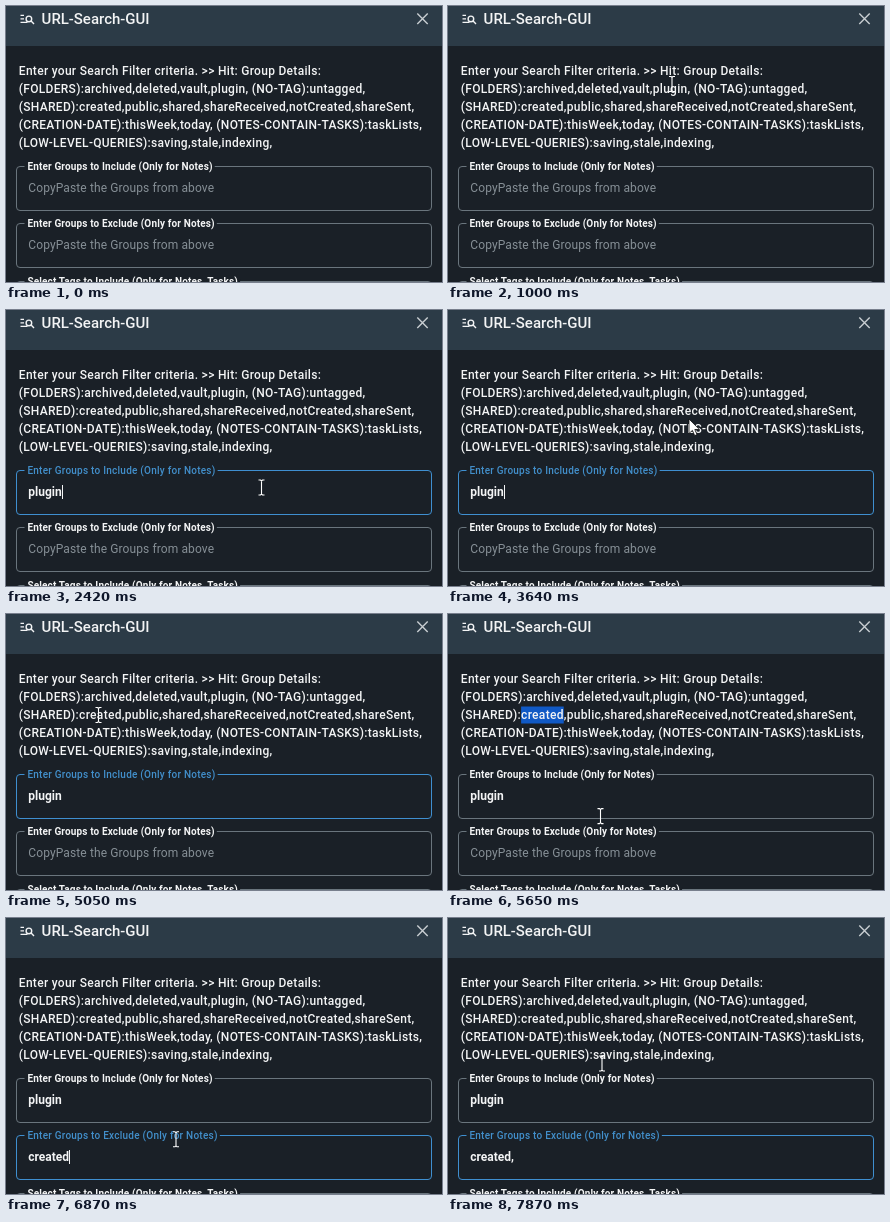
An HTML page for the animation above (8000 ms loop, 436 by 276 pixels).

```html
<!DOCTYPE html>
<html lang="en">
<head>
<meta charset="utf-8">
<title>Search dialog</title>
<style>
  html, body { margin: 0; width: 100%; height: 100%; overflow: hidden; background: #1a2027; }
  svg { display: block; width: 436px; height: 276px; font-family: Roboto, Arial, sans-serif; }
  text { fill: #f3f4f5; font-weight: 500; white-space: pre; }
  .title { font-size: 15px; }
  .body { font-size: 12px; letter-spacing: .3px; }
  .label { font-size: 10px; font-weight: 700; letter-spacing: .14px; }
  .label.focused { font-weight: 500; letter-spacing: .24px; fill: #428fcb; }
  .value { font-size: 12px; font-weight: 700; }
  .hint { font-size: 12px; letter-spacing: .11px; font-weight: 400; fill: #868f96; }
</style>
</head>
<body>
<svg id="stage" viewBox="0 0 436 276">
  <rect width="436" height="276" fill="#1a2027"/>
  <rect width="436" height="40" fill="#2c3b47"/>
  <g transform="translate(13.1 5.2) scale(.7)" fill="none" stroke="#f3f4f5" stroke-width="2">
    <path d="M2 6H7M2 11H7M2 16H12M16.8 13.8L21.3 18.3"/>
    <circle cx="14" cy="11" r="4"/>
  </g>
  <text class="title" x="35.6" y="18">URL-Search-GUI</text>
  <path d="M411.3 7.5l10.4 10.4m0-10.4l-10.4 10.4" stroke="#c9ced2" stroke-width="1.4"/>
</svg>
<script>
const LOOP = 8000, TICK = 201.8;
const GREY = '#6a757d', FOCUSING = '#7f9bb0', BLUE = '#3f8fd0', WHITE = '#f3f4f5';
const stage = document.getElementById('stage');

function add(tag, attrs, text = '') {
  const node = document.createElementNS('http://www.w3.org/2000/svg', tag);
  set(node, attrs);
  node.textContent = text;
  return stage.appendChild(node);
}

function set(node, attrs) {
  for (const key in attrs) node.setAttribute(key, attrs[key]);
}

const show = (node, on) => set(node, { visibility: on ? 'visible' : 'hidden' });

const selection = add('rect', { height: 17, fill: '#1059c5' });

const lines = [
  'Enter your Search Filter criteria. >> Hit: Group Details:',
  '(FOLDERS):archived,deleted,vault,plugin, (NO-TAG):untagged,',
  '(SHARED):created,public,shared,shareReceived,notCreated,shareSent,',
  '(CREATION-DATE):thisWeek,today, (NOTES-CONTAIN-TASKS):taskLists,',
  '(LOW-LEVEL-QUERIES):saving,stale,indexing,'
].map((text, i) => add('text', { class: 'body', x: 12.8, y: 69 + 18 * i }, text));

function makeField(top, caption) {
  const box = add('rect', { x: 10.5, y: top, width: 415, height: 44, rx: 3.5, fill: 'none' });
  const notch = add('rect', { x: 18.5, y: top - 2, height: 4, fill: '#1a2027' });
  const label = add('text', { x: 21.4, y: top + 3.5 }, caption);
  const hint = add('text', { class: 'hint', x: 22.3, y: top + 25.5 }, 'CopyPaste the Groups from above');
  const value = add('text', { class: 'value', x: 22.3, y: top + 25.5 });
  const caret = add('rect', { y: top + 14.5, width: 1, height: 14, fill: WHITE });
  return { box, notch, label, hint, value, caret };
}

const include = makeField(160.5, 'Enter Groups to Include (Only for Notes)');
const exclude = makeField(217.5, 'Enter Groups to Exclude (Only for Notes)');
const tags = makeField(275.5, 'Select Tags to Include (Only for Notes, Tasks)');

const beam = add('path', {
  d: 'M-3 -7.5H-1L0 -6.5L1 -7.5H3M0 -6.5V6.5M-3 7.5H-1L0 6.5L1 7.5H3',
  fill: 'none', stroke: '#fff', 'stroke-width': 1.1
});
const arrow = add('path', {
  d: 'M0 0V14.5L3.4 11.4L5.7 16.6L8 15.6L5.8 10.5H10.4Z',
  fill: '#fff', stroke: '#111', 'stroke-width': .8
});

// Pointer waypoints: tick, x, y
const route = [
  [2, 350, 205], [5, 224, 78], [6, 224, 80], [7, 232, 102], [8, 250, 228],
  [9, 255.5, 175.5], [12, 255.5, 177.5], [13, 247, 172], [16, 241, 109],
  [19, 241, 109], [20, 222, 160], [21, 150, 233], [24, 92.5, 101],
  [26, 92.5, 101], [29, 173.5, 237.5], [33, 173.5, 237.5], [36, 160, 175],
  [37, 160, 175], [39, 154, 145.5]
];

function pointerAt(tick) {
  const next = route.findIndex(p => p[0] > tick);
  if (next < 0) return route[route.length - 1].slice(1);
  const a = route[Math.max(0, next - 1)], b = route[next];
  const u = Math.max(0, (tick - a[0]) / (b[0] - a[0]));
  const ease = u * u * (3 - 2 * u);
  return [1, 2].map(i => a[i] + (b[i] - a[i]) * ease);
}

function drawField(field, { text = '', border = GREY, focused = false, caretOn = false } = {}) {
  set(field.box, { stroke: border });
  set(field.label, { class: focused ? 'label focused' : 'label' });
  set(field.notch, { width: field.label.getComputedTextLength() + 5 });
  field.value.textContent = text;
  show(field.hint, !text);
  set(field.caret, { x: Math.round(22.3 + (text ? field.value.getComputedTextLength() : 0.4)) });
  show(field.caret, caretOn);
}

function drawSelection(line, word) {
  show(selection, !!word);
  if (!word) return;
  const node = lines[line], start = node.textContent.indexOf(word);
  set(selection, {
    x: node.getStartPositionOfChar(start).x,
    y: 74.5 + 18 * (line - 1),
    width: node.getSubStringLength(start, word.length)
  });
}

const blink = (tick, since) => (tick - since) % 5 < 3;

function render(time) {
  const tick = Math.floor((time + 14) / TICK);
  const within = (from, to) => tick >= from && tick < to;

  if (within(6, 10)) drawSelection(1, 'plugin');
  else if (within(26, 30)) drawSelection(2, 'created');
  else drawSelection();

  const inInclude = within(10, 26), inExclude = tick >= 30;
  drawField(include, {
    text: tick >= 12 ? 'plugin' : '',
    border: !inInclude ? GREY : tick === 10 ? FOCUSING : BLUE,
    focused: within(11, 26),
    caretOn: inInclude && blink(tick, tick < 12 ? 10 : 12)
  });
  drawField(exclude, {
    text: tick >= 35 ? 'created,' : tick >= 32 ? 'created' : '',
    border: !inExclude ? GREY : tick === 30 ? FOCUSING : BLUE,
    focused: tick >= 32,
    caretOn: inExclude && blink(tick, tick < 32 ? 30 : tick < 35 ? 32 : 35)
  });
  drawField(tags);

  const place = { transform: `translate(${pointerAt(tick)})` };
  const asArrow = within(16, 20);
  set(beam, place);
  set(arrow, place);
  show(beam, tick >= 2 && !asArrow);
  show(arrow, asArrow);
}

const begin = performance.now();
function loop() {
  render((performance.now() - begin) % LOOP);
  requestAnimationFrame(loop);
}
loop();
</script>
</body>
</html>
```
